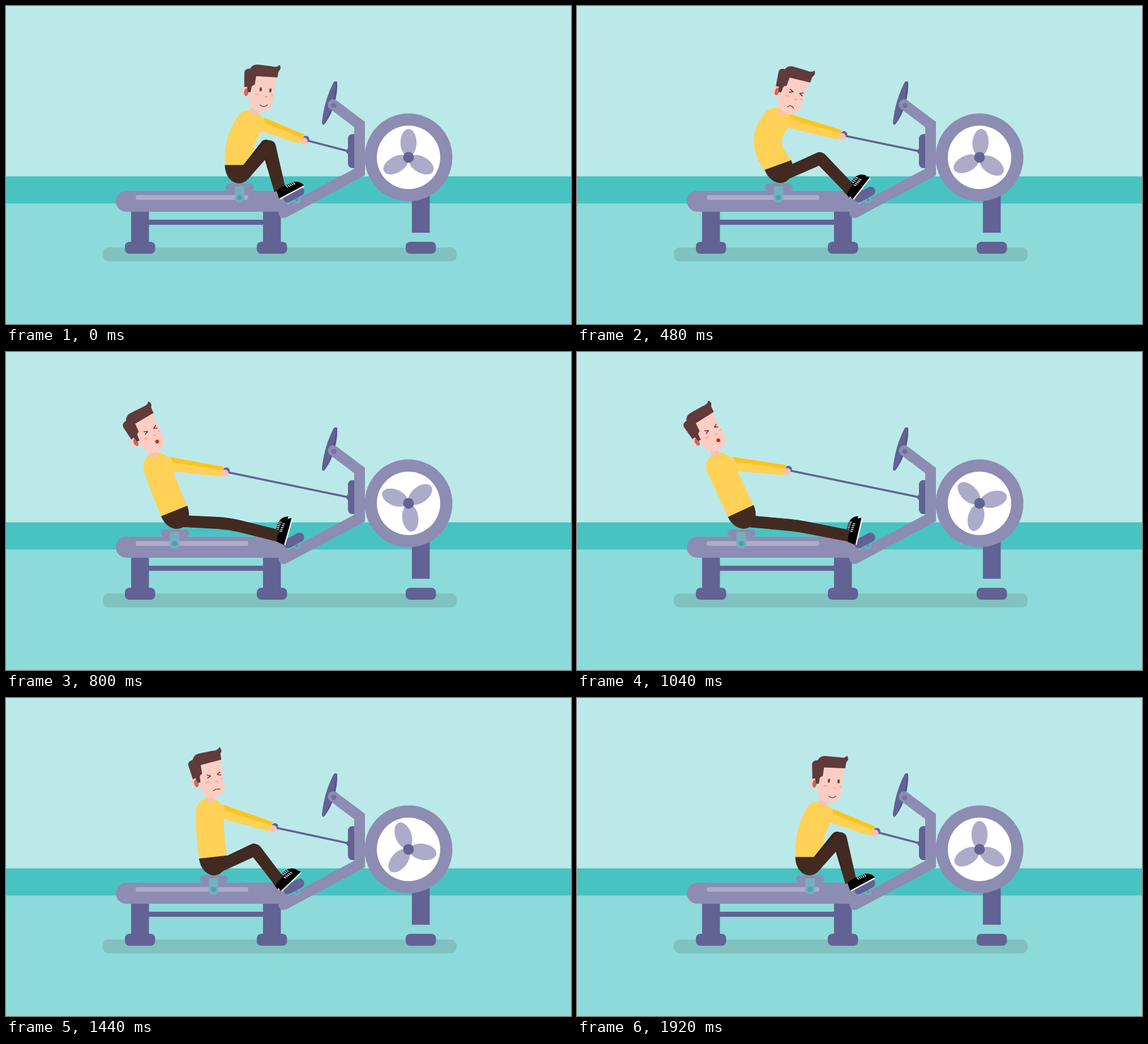
An HTML page with a canvas for the animation above (2 s loop, 998 px wide and 561 px high).

```html
<!DOCTYPE html>
<html>
<head>
<meta charset="utf-8">
<title>Rowing machine</title>
<style>
html, body { margin: 0; width: 100%; height: 100%; overflow: hidden; background: #bbe9e9; }
canvas { display: block; }
</style>
</head>
<body>
<canvas id="stage" width="998" height="561"></canvas>
<script>
const ctx = document.getElementById('stage').getContext('2d');
const LIGHT = '#8d8cb2', DARK = '#626294', PALE = '#acabc9', TEAL = '#73afbc', DEEP_TEAL = '#4f9fb2';
const SHIRT = '#ffd157', SHADE = '#ffc31e', PANTS = '#422a21', SKIN = '#fccdc3', NECK = '#fcc0b1';
const HAIR = '#613a3b', LINE = '#5c3836';
const STEP = 80, STEPS = 25;

// step: seat, pelvis tilt, spine bend x, shoulder x y, eyes x y, head tilt, hand x y, knee x y, foot tilt, fan
const poses = [
  [0, 412.5, 0, 408, 430, 208, 458.5, 148, 6, 528, 237, 466, 246, -28, 0],
  [3, 379.5, -17, 364, 385, 208, 435, 160, 19, 500, 234, 447, 257, -43, 1.5],
  [6, 356, -20, 321, 351, 204, 387.5, 153, 16, 470, 229, 431, 269, -52, 4],
  [10, 298, -22, 279, 267, 202, 255.5, 137.5, -28, 388, 212, 395, 303, -74, 53],
  [13.5, 290, -25, 270, 252, 202, 237, 135.5, -30, 372, 209, 390, 307, -77, 77],
  [16, 333, -12, 322, 312.5, 200.5, 306.5, 135, -23, 431, 221, 415, 284, -56.5, 92],
  [20, 392, -3, 387, 395.5, 202.5, 415, 138.5, -3, 504, 234, 459, 256, -35, 106.5],
  [24, 411.5, 0, 408, 426.5, 207, 453.5, 146.5, 4.5, 528, 237, 466, 246, -28, 120]
];

const key = i => {
  const n = poses.length, turn = Math.floor(i / n), row = poses[i - turn * n];
  return [row[0] + turn * STEPS, ...row.slice(1)];
};

// Monotone cubic through the key poses
function poseAt(step) {
  let i = poses.length - 1;
  while (poses[i][0] > step) i--;
  const [p, a, b, q] = [-1, 0, 1, 2].map(k => key(i + k));
  const h = b[0] - a[0], u = (step - a[0]) / h;
  const slope = (m, n) => m * n > 0 ? 2 * m * n / (m + n) : 0;
  return a.map((v, c) => {
    const before = (v - p[c]) / (a[0] - p[0]), mid = (b[c] - v) / h, after = (q[c] - b[c]) / (q[0] - b[0]);
    const s0 = slope(before, mid) * h, s1 = slope(mid, after) * h, d = b[c] - v;
    return v + u * (s0 + u * (3 * d - 2 * s0 - s1 + u * (s0 + s1 - 2 * d)));
  }).slice(1);
}

const rad = deg => deg * Math.PI / 180;

function fill(color, path) {
  ctx.fillStyle = color;
  ctx.fill(new Path2D(path));
}
function stroke(color, width, path, cap = 'round', join = 'round') {
  Object.assign(ctx, { strokeStyle: color, lineWidth: width, lineCap: cap, lineJoin: join });
  ctx.stroke(new Path2D(path));
}
function box(color, x, y, w, h, r = 0) {
  ctx.fillStyle = color;
  ctx.beginPath();
  ctx.roundRect(x, y, w, h, r);
  ctx.fill();
}
function oval(color, x, y, rx, ry = rx) {
  ctx.fillStyle = color;
  ctx.beginPath();
  ctx.ellipse(x, y, rx, ry, 0, 0, 2 * Math.PI);
  ctx.fill();
}
function at(x, y, angle, draw) {
  ctx.save();
  ctx.translate(x, y);
  ctx.rotate(angle);
  draw();
  ctx.restore();
}

function scene() {
  box('#bbe9e9', 0, 0, 998, 301);
  box('#49c2c2', 0, 300.5, 998, 48);
  box('#8ddada', 0, 348.5, 998, 213);
  box('#7fc2bf', 171, 426, 625, 24.5, 10);
}

function machine(fan) {
  box(DARK, 250, 377, 206, 9);
  for (const [x, y] of [[221, 355], [454, 355], [717, 330]]) {
    box(DARK, x, y, 31.5, 70);
    box(DARK, x - 11, 416, 53.5, 21, 8);
  }
  box(LIGHT, 194, 326, 304, 37, 18.5);
  box(PALE, 229, 333.5, 199, 8.5, 4);

  oval(LIGHT, 711, 267, 77.5);
  oval('#fff', 711, 267, 56);
  for (let i = 0; i < 3; i++)
    at(711, 267, rad(fan + i * 120), () => oval(PALE, 0, -26, 14.2, 24));
  oval(DARK, 711, 267, 9.5);

  box(DARK, 604, 226, 22, 60, 8);
  oval(DARK, 606, 256.5, 5);
  fill('#54528a', 'M580 134Q585 131 585 136C586 158 578 190 562 209Q559 211 559 206Z');
  fill(DARK, 'M579 134Q583 131 583 136C582 158 575 188 561 209Q558 210 558 205C561 178 568 155 579 134Z');
  stroke(LIGHT, 19, 'M490.5 364.5L624.5 293V209L578 174', 'round', 'miter');
  oval('#73729f', 579, 175.5, 4.5);
  oval(TEAL, 514, 342, 6);
  oval(DEEP_TEAL, 514, 342, 3);
  stroke(DARK, 16.5, 'M498 338L518.5 327');
}

function seat(x) {
  box(LIGHT, x - 24.5, 313, 49.5, 13, 6.5);
  box(TEAL, x - 8.5, 318, 17, 29, [3, 3, 8, 8]);
  oval(DEEP_TEAL, x, 338, 4.5);
}

function leg(color, hipX, kneeX, kneeY) {
  const reach = Math.hypot(484 - hipX, 26);
  Object.assign(ctx, { strokeStyle: color, lineWidth: 20.5, lineCap: 'butt', lineJoin: 'round' });
  ctx.beginPath();
  ctx.moveTo(hipX, 298);
  ctx.arcTo(kneeX, kneeY, 484, 325, Math.max(1, (reach - 145) * 6));
  ctx.lineTo(484, 325);
  ctx.stroke();
}

function shoe(x, y, angle) {
  at(x, y, angle, () => {
    fill('#000', 'M-9.5 7L-7 -8Q0 -11 10 -9L25 -8Q37 -6 40 6Z');
    stroke('#fff', 2.2, 'M-9 7L39.5 7', 'butt');
    for (let i = 0; i < 5; i++)
      stroke('#fff', 1.4, `M${12 + i * 3.4} ${-8.5 + i * .3}l1.4 4.5`, 'butt');
  });
}

function arm(sx, sy, hx, hy) {
  const aim = Math.atan2(hy - sy, hx - sx);
  const rx = sx + 24 * Math.cos(aim), ry = sy + 24 * Math.sin(aim) - 6;
  const n = Math.hypot(hx - rx, hy - ry);
  stroke(DARK, 3.5, `M${hx + 3} ${hy}L606 256.5`);
  at(rx, ry, Math.atan2(hy - ry, hx - rx), () => {
    oval(DARK, n + 1, -2.5, 6);
    oval(NECK, n - 1, 2, 6.3);
    fill(SHIRT, `M-12 -11L0 -12L${n - 5} -9L${n - 7} 9L0 12L-12 12Z`);
    fill(SHADE, `M-2 -12L${n - 5} -9L${n - 6} -2.5L3 -4Z`);
  });
}

const mouths = {
  smile: 'M-7 27Q0 33 6 26',
  flat: 'M-8 27Q-3 25 3 26.5',
  frown: 'M-8 28Q-3 21.5 3 28',
  pout: 'M-7 26.5Q-1 23.5 5 26.5'
};
const mouthAt = step =>
  step < 2 || step > 21 ? 'smile' : step < 5 ? 'flat' : step < 8 ? 'frown' : step < 18 ? 'puff' : 'pout';

function head(step) {
  stroke(NECK, 14, 'M-15 30V39');
  oval(SKIN, -35.5, 6, 6, 9.5);
  oval('#c9695f', -33.5, 7.5, 3.8, 6.8);
  fill(SKIN, 'M-31 -26L17 -26L14.5 20Q13 35 2 37.5Q-14 41 -22 33Q-28 27 -29 10Z');
  fill(HAIR, 'M-38 -1L-40.5 -27Q-40 -34 -31 -34.5Q-28 -42 -19 -43L6 -42.5Q17 -41 20 -46.5Q25 -40 19.5 -35L18.5 -24L-19 -22.5L-20 -7Q-24 -6 -25 -3L-26 7L-31 7L-33 -2Z');
  oval('#fbb0a0', -14.5, 9.6, 4, 1.6);
  oval('#fbb0a0', 12.3, 9, 2.4, 1.6);
  stroke('#f79c86', 1.8, 'M.5 12H4');
  const mouth = mouthAt(step);
  if (mouth === 'smile') {
    oval('#6b4038', -8.6, 0, 2, 3.7);
    oval('#6b4038', 8.6, 0, 2, 3.7);
  } else {
    stroke(LINE, 1.6, 'M-12 -3L-6 0L-12 2.5M11.5 -3L6 0L11.5 2.5');
  }
  if (mouth === 'puff') oval('#c62a20', .5, 23.5, 3.4);
  else stroke(LINE, 1.3, mouths[mouth]);
}

function draw(step) {
  const [seatX, pelvis, bendX, sx, sy, ex, ey, tilt, hx, hy, kx, ky, foot, fan] = poseAt(step);
  const waistX = seatX - 1, far = Math.min(1, (-foot - 28) / 15);
  scene();
  machine(fan);
  seat(seatX);
  shoe(488 - 6 * far, 330 - 3 * far, rad(foot));
  stroke(SHIRT, 49, `M${waistX} 280.5Q${bendX} 240 ${sx} ${sy}`);
  leg('#38231b', seatX + 6, kx - 6 * (1 - far * .6), ky - 1);
  leg(PANTS, seatX + 8, kx, ky);
  at(waistX, 280.5, rad(pelvis), () => {
    ctx.fillStyle = PANTS;
    ctx.beginPath();
    ctx.ellipse(0, 0, 25, 32.5, 0, 0, Math.PI);
    ctx.fill();
  });
  shoe(488, 330, rad(foot));
  arm(sx, sy, hx, hy);
  at(ex, ey, rad(tilt), () => head(step));
}

function tick() {
  draw(Math.floor(performance.now() / STEP) % STEPS);
  requestAnimationFrame(tick);
}
tick();
</script>
</body>
</html>
```
